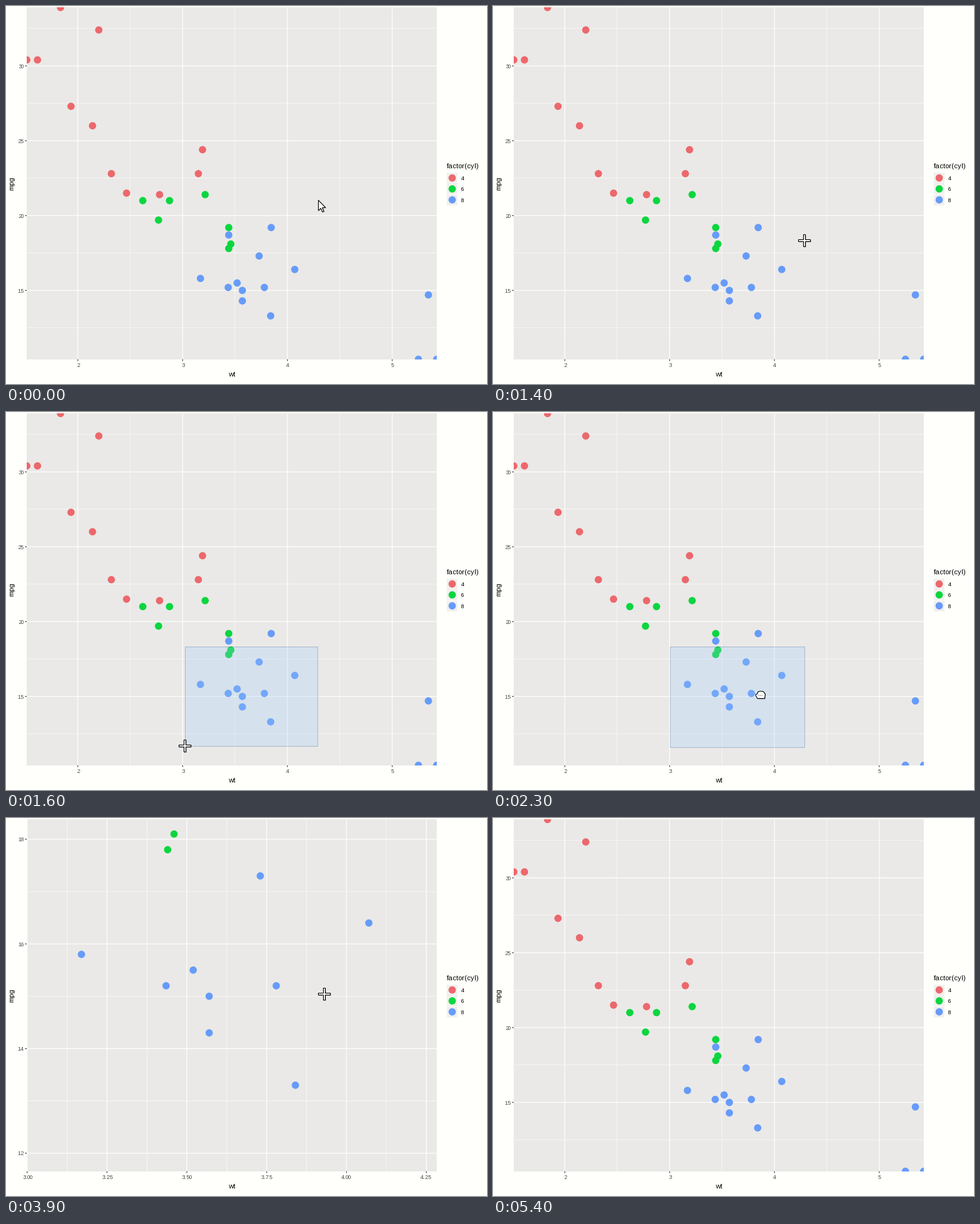
Recreate the animation shown at these times as a matplotlib script. Size 766 by 601 pixels, loop 6100 ms.

```python
import numpy as np
import matplotlib.pyplot as plt
from matplotlib.animation import FuncAnimation
from matplotlib.collections import PatchCollection
from matplotlib.patches import Circle, Polygon, Rectangle

W, H, DPI = 766, 601, 64
PX = 72 / DPI  # points per pixel
LEFT, TOP, RIGHT, BOTTOM = 33.1, 2.4, 686, 561.7
PAGE, PANEL, KEY = "#fffffb", "#eae9e7", "#f1f0ee"
COLORS = {4: "#ec686c", 6: "#0cd63f", 8: "#669bf9"}

# mtcars: (wt, mpg) by number of cylinders
CARS = {
    4: [(2.32, 22.8), (3.19, 24.4), (3.15, 22.8), (2.2, 32.4), (1.615, 30.4),
        (1.835, 33.9), (2.465, 21.5), (1.935, 27.3), (2.14, 26), (1.513, 30.4),
        (2.78, 21.4)],
    6: [(2.62, 21), (2.875, 21), (3.215, 21.4), (3.46, 18.1), (3.44, 19.2),
        (3.44, 17.8), (2.77, 19.7)],
    8: [(3.44, 18.7), (3.57, 14.3), (4.07, 16.4), (3.73, 17.3), (3.78, 15.2),
        (5.25, 10.4), (5.424, 10.4), (5.345, 14.7), (3.52, 15.5), (3.435, 15.2),
        (3.84, 13.3), (3.845, 19.2), (3.17, 15.8), (3.57, 15)],
}

plt.rcParams.update({
    "font.family": "Liberation Sans",
    "text.hinting_factor": 1,  # whole-pixel letter spacing
    "toolbar": "None",
})
fig = plt.figure(figsize=(W / DPI, H / DPI), dpi=DPI, facecolor=PAGE)
ax = fig.add_axes([0, 0, 1, 1])
ax.set_xlim(0, W)
ax.set_ylim(H, 0)
ax.axis("off")

panel = Rectangle((LEFT, TOP), RIGHT - LEFT, BOTTOM - TOP, fc=PANEL, lw=0, zorder=0)
ax.add_patch(panel)


def line(xs, ys, color, width, z):
    return ax.plot(xs, ys, color=color, lw=width * PX, zorder=z, snap=False,
                   solid_capstyle="butt")[0]


def label(x, y, s, size, color="black", **kw):
    kw = {"ha": "left", "va": "baseline", **kw}
    return ax.text(x, y, s, fontsize=size * PX, color=color, zorder=4, **kw)


def dots(points, color):
    circles = [Circle(p, 5.8) for p in points]
    return ax.add_collection(PatchCollection(circles, fc=color, lw=0, zorder=3))


def build_view(x0, y0, sx, sy, xticks, yticks, xfmt):
    """Draw grid, ticks and points; (x0, y0) is the value at the lower left."""
    def to_x(v):
        return LEFT + (v - x0) * sx

    def to_y(v):
        return BOTTOM - (v - y0) * sy

    def with_minor(ticks):
        step = ticks[1] - ticks[0]
        minor = np.append(ticks - step / 2, ticks[-1] + step / 2)
        return [(v, 0.6, 1) for v in minor] + [(v, 1.2, 2) for v in ticks]

    arts = []
    for v, width, z in with_minor(xticks):
        p = to_x(v)
        if LEFT <= p <= RIGHT:
            arts.append(line([p, p], [TOP, BOTTOM], "white", width, z))
    for v, width, z in with_minor(yticks):
        p = to_y(v)
        if TOP <= p <= BOTTOM:
            arts.append(line([LEFT, RIGHT], [p, p], "white", width, z))

    for v in xticks:
        p = to_x(v)
        arts.append(line([p, p], [BOTTOM, BOTTOM + 2.8], "#333333", 1.1, 2))
        arts.append(label(p, 574, format(v, xfmt), 9, "#4d4d4d", ha="center"))
    for v in yticks:
        p = to_y(v)
        arts.append(line([LEFT - 2.8, LEFT], [p, p], "#333333", 1.1, 2))
        arts.append(label(28.4, p + 3.4, f"{v:.0f}", 9, "#4d4d4d", ha="right"))

    for cyl, cars in CARS.items():
        group = dots([(to_x(wt), to_y(mpg)) for wt, mpg in cars], COLORS[cyl])
        group.set_clip_path(panel)
        arts.append(group)
    return arts


full_view = build_view(1.513, 10.4, 166.9, 23.8,
                       np.arange(2, 6), np.arange(15, 31, 5), ".0f")
zoom_view = build_view(2.9988, 11.655, 508.5, 83.2,
                       np.arange(3, 4.3, 0.25), np.arange(12, 19, 2), ".2f")

label(359.6, 589, "wt", 11, ha="center")
label(12.4, 281.8, "mpg", 11, ha="center", rotation=90, rotation_mode="anchor")
label(702, 258, "factor(cyl)", 11)
for i, (cyl, color) in enumerate(COLORS.items()):
    y = 273.4 + 17.4 * i
    ax.add_patch(Rectangle((702, y - 8.7), 17.3, 17.4, fc=KEY, lw=0, zorder=1))
    dots([(710.6, y)], color)
    label(725, y + 3.5, str(cyl), 9)

brush = Rectangle((0, 0), 1, 1, fc=(0.6, 0.8, 1, 0.25), ec=(0, 0.2, 0.4, 0.25),
                  lw=PX, zorder=5)
ax.add_patch(brush)


def cross_outline(arm=9.5, half=1.5):
    """One arm's corners, turned by quarter circles."""
    corner = np.array([(half, half), (half, arm), (-half, arm)])
    turn = np.array([(0, 1), (-1, 0)])
    return np.vstack([corner @ np.linalg.matrix_power(turn, k) for k in range(4)])


# Outlines around the hot spot
SHAPES = {
    "arrow": np.array([(0.5, 0.8), (0.5, 17.2), (4.3, 13.7), (6.9, 19.4),
                       (9.3, 18.3), (6.8, 12.8), (11.8, 12.3)]),
    "cross": cross_outline(),
    "hand": np.array([(-7.5, -1), (-4.9, -2), (-4.2, -5), (-1, -6), (4, -5.7),
                      (6.3, -3.6), (7.5, -1), (6.6, 5.5), (-4.8, 5.5), (-7.3, 1.5)]),
}
shadow = Polygon([(0, 0)] * 3, fc=(0, 0, 0, 0.15), ec=(0, 0, 0, 0.1),
                 lw=PX, joinstyle="round", zorder=6)
cursor = Polygon([(0, 0)] * 3, fc="white", ec="black", lw=1.1 * PX,
                 joinstyle="round", zorder=7)
ax.add_patch(shadow)
ax.add_patch(cursor)
knuckles = ax.plot([], [], color="#555555", lw=PX, ls=(0, (1.2, 1.4)), zorder=8)[0]

# Each move: first tick, steps, cursor shape, end point
MOVES = [
    (0, 1, "arrow", 497, 308),
    (5, 1, "cross", 498, 310),
    (9, 1, "cross", 508, 344),
    (11, 2, "cross", 495, 372),
    (15, 3, "cross", 281, 532),
    (21, 3, "hand", 426, 450),
    (37, 1, "cross", 427, 449),
    (38, 2, "cross", 506, 279),
    (51, 2, "cross", 29, 42),
]
PRESS, RELEASE, ZOOM_IN, ZOOM_OUT, LEAVE = 14, 20, 29, 48, 54


def pointer(tick):
    """Cursor shape and position; every move eases out to its end point."""
    i = max(n for n, move in enumerate(MOVES) if move[0] <= tick)
    first, steps, shape, *end = MOVES[i]
    start = np.array(MOVES[max(i - 1, 0)][3:])
    u = min((tick - first + 1) / steps, 1)
    eased = 1 - (1 - u) ** 4
    return shape, np.round(start + (np.array(end) - start) * eased)


def draw(tick):
    zoomed = ZOOM_IN <= tick < ZOOM_OUT
    for art in full_view:
        art.set_visible(not zoomed)
    for art in zoom_view:
        art.set_visible(zoomed)

    brush.set_visible(PRESS <= tick < ZOOM_IN)
    x1, y0 = pointer(PRESS)[1] + 0.5
    x0, y1 = pointer(min(max(tick, PRESS), RELEASE))[1] + 0.5
    brush.set_bounds(x0, y0, x1 - x0, y1 - y0)

    shape, pos = pointer(tick)
    outline = SHAPES[shape] + pos
    cursor.set_xy(outline)
    shadow.set_xy(outline + 1)
    knuckles.set_data(pos[0] + [-3.6, 4.4], pos[1] + [-0.5, -0.5])
    for art in (cursor, shadow):
        art.set_visible(tick < LEAVE)
    knuckles.set_visible(shape == "hand")
    return []


anim = FuncAnimation(fig, draw, frames=61, interval=100, repeat=True,
                     repeat_delay=0, blit=False)
plt.show()
```
